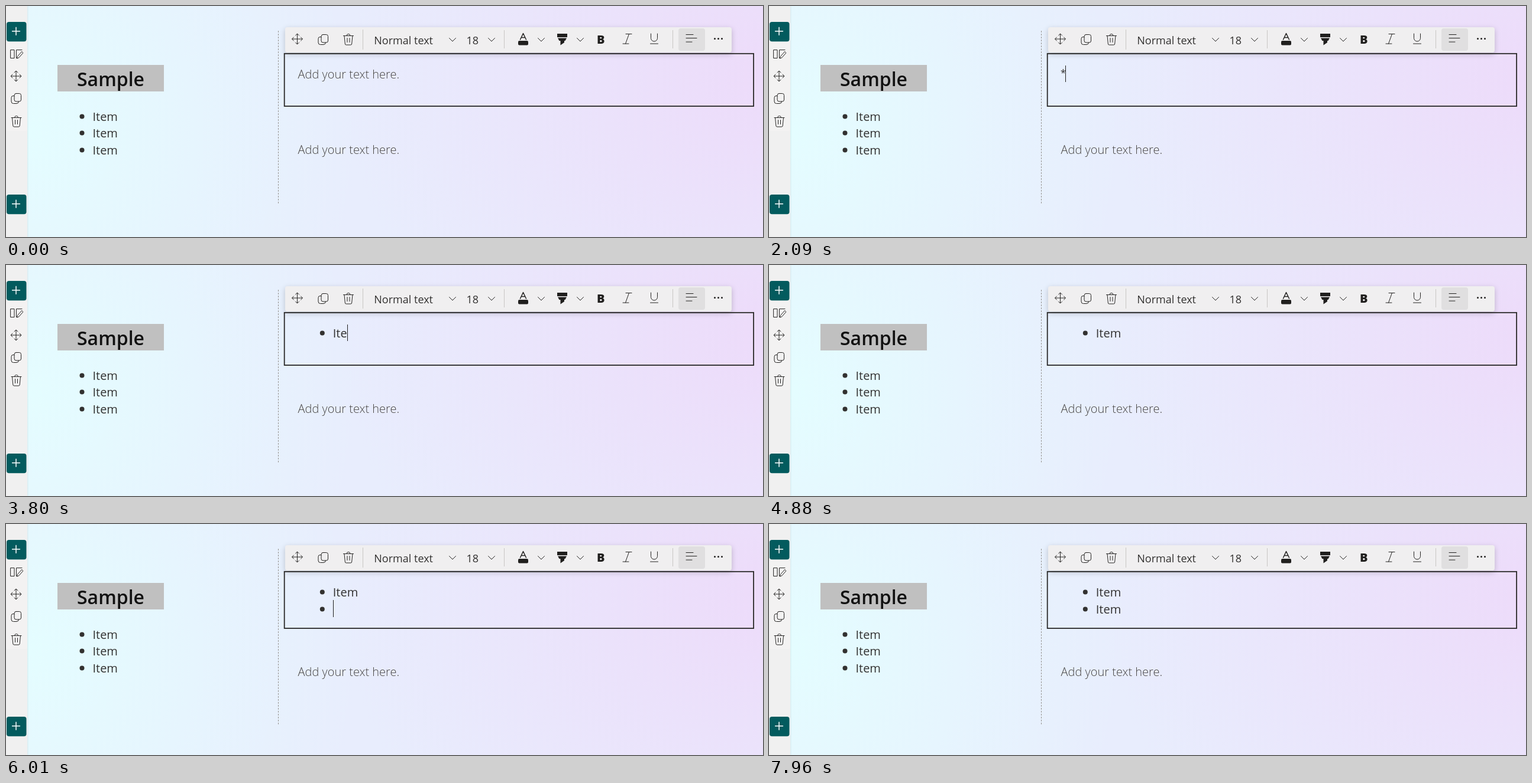
An HTML page that plays this animation: 1280 px wide and 392 px high, repeating every 8000 ms.

```html
<!DOCTYPE html>
<html lang="en">
<head>
<meta charset="utf-8">
<title>Typing a bulleted list</title>
<style>
  html, body { margin: 0; width: 100%; height: 100%; overflow: hidden; }
  body {
    background:
      radial-gradient(ellipse 560px 620px at 40px 215px, #e4fdff, #e4fdff00),
      radial-gradient(ellipse 720px 640px at 1290px 120px, #eddbfa, #eddbfa00),
      #e8edfd;
  }
  svg { display: block; width: 100vw; height: 100vh; }
  text { font: 20px "Open Sans", "Noto Sans", sans-serif; fill: #323130; }
  .hint { font-weight: 300; fill: #484644; }
  .tool { font-size: 18px; }
  .icon { fill: none; stroke: #252423; stroke-linecap: round; stroke-linejoin: round; }
  .solid { fill: #201f1e; }
  .rule { stroke: #c8c6c4; }
  .raised { filter: drop-shadow(0 3px 5px #0003); }
</style>
</head>
<body>
<svg viewBox="0 0 1280 392">
  <defs>
    <path id="move" d="M-8.5 0H8.5M0-8.5V8.5M-3-6 0-9 3-6M-3 6 0 9 3 6M-6-3-9 0-6 3M6-3 9 0 6 3"/>
    <path id="copy" d="M0-8.5H5.5a3 3 0 0 1 3 3V2a3 3 0 0 1-3 3H0a3 3 0 0 1-3-3V-5.5a3 3 0 0 1 3-3ZM-3-4.5H-5a3 3 0 0 0-3 3V5a3.5 3.5 0 0 0 3.5 3.5H1a3.5 3.5 0 0 0 3.5-3.5"/>
    <path id="trash" d="M-8.5-6.5H8.5M-3-6.5a3 3 0 0 1 6 0M-7-6.5-5.7 7a2 2 0 0 0 2 2H3.7a2 2 0 0 0 2-2L7-6.5M-2-2.5V4.5M2-2.5V4.5"/>
    <path id="chevron" d="M-5.5-2.5 0 3 5.5-2.5"/>
    <g id="add">
      <rect x="1" width="33.5" height="33.3" rx="4" fill="#035b5e"/>
      <path d="M10 15.7H24M17 8.7V22.7" stroke="#fff" stroke-width="1.5"/>
    </g>
  </defs>

  <rect width="36" height="392" fill="#f0f0f0" style="filter:drop-shadow(1px 0 1px #0001)"/>
  <rect y="61" width="36" height="151" rx="3" fill="#f3f2f2"/>
  <use href="#add" y="27"/>
  <use href="#add" id="addBelow"/>
  <g class="icon">
    <path d="M8 74.5h6v14H8ZM27 74.5H17.5v14H19M26.5 77.5l-7 8-1 3.5 3.3-1.3 6.7-7.7Z"/>
    <use href="#move" x="17" y="119"/>
    <use href="#copy" x="17" y="157"/>
    <use href="#trash" x="17.5" y="196"/>
  </g>

  <rect x="87" y="100" width="180" height="45" fill="#c0c0c0"/>
  <text x="120" y="136" style="font-size:32px;font-weight:600;fill:#111">Sample</text>
  <g id="list"></g>
  <path id="divider" stroke="#979593" stroke-dasharray="3 2"/>

  <rect id="frame" x="470.7" y="80.8" width="793.4" fill="none" stroke="#292827" stroke-width="1.8"/>
  <g class="raised">
    <rect x="472" y="36" width="755" height="43" rx="4" fill="#f0eff0"/>
  </g>
  <rect x="1137" y="38" width="45" height="38" rx="4" fill="#e0dfe0"/>
  <path class="rule" d="M603.5 40V74M842.5 41V72M1127.5 41V72"/>
  <g class="icon">
    <use href="#move" x="492.5" y="56"/>
    <use href="#copy" x="536" y="57"/>
    <use href="#trash" x="579" y="57"/>
    <use href="#chevron" x="755" y="57"/>
    <use href="#chevron" x="821" y="57"/>
    <use href="#chevron" x="905" y="57"/>
    <use href="#chevron" x="971" y="57"/>
    <path d="M869.5 57 874.5 46.5 879.5 57M871.3 53.5H877.7" stroke-width="1.5"/>
    <path d="M1048 47.5H1058M1043 64H1053M1053.5 47.5 1047.5 64"/>
    <path d="M1090.5 47V54.5a5.5 5.5 0 0 0 11 0V47M1089.5 64H1102.5"/>
    <path d="M1150 48.5H1162M1150 54.5H1168M1150 61H1160"/>
  </g>
  <g class="solid">
    <rect x="866" y="59" width="17" height="7.5" rx="2"/>
    <path d="M932 47H949V53H932ZM933 54.5H948L945.5 59H944V62L937.5 66.5V59H935.5Z"/>
    <circle cx="1198.5" cy="55.5" r="1.5"/>
    <circle cx="1204.5" cy="55.5" r="1.5"/>
    <circle cx="1210.5" cy="55.5" r="1.5"/>
  </g>
  <text class="tool" x="622.3" y="65">Normal text</text>
  <text class="tool" x="778.5" y="65">18</text>
  <text x="999" y="63.5" style="font-weight:800;fill:#201f1e">B</text>

  <text class="hint" id="hint" x="493.5" y="123">Add your text here.</text>
  <text id="star" x="493" y="119" style="font-size:16px">*</text>
  <g id="typed"></g>
  <rect id="caret" width="1" fill="#201f1e"/>
  <text class="hint" id="hintBelow" x="493.5">Add your text here.</text>
</svg>
<script>
const $ = id => document.getElementById(id);
const LOOP = 8000, BLINK = 203, WORD = 'Item';
const HINT = -2, STAR = -1;          // 0-4: letters in line one, 5-9: letters in line two
const caretX = [553, 558, 565, 577, 595];

// [editor state, start time]; every entry restarts the caret blink.
const steps = [
  [HINT, -266], [STAR, 1684],
  [0, 2420], [1, 3290], [1, 3347], [2, 3650], [3, 3800], [4, 4072],
  [5, 5010], [6, 6160], [7, 6520], [8, 6690], [9, 6945]
];

const bullet = (x, y, label) =>
  `<g><circle cx="${x}" cy="${y - 7.5}" r="4" fill="#323130"/><text x="${x + 18}" y="${y}">${label}</text></g>`;
const show = (el, on) => el.setAttribute('visibility', on ? 'visible' : 'hidden');
const set = (el, attrs) => { for (const k in attrs) el.setAttribute(k, attrs[k]); };

$('list').innerHTML = [195, 223, 252].map(y => bullet(128.5, y, WORD)).join('');
$('typed').innerHTML = [123, 152].map(y => bullet(534.8, y, '')).join('');
const lines = [...$('typed').children];

function draw(t) {
  const [state, start] = steps.findLast(s => s[1] <= t);
  const second = state >= 5, grow = second ? 7 : 0;

  show($('hint'), state === HINT);
  show($('star'), state === STAR);
  lines.forEach((line, i) => {
    const count = state - i * 5;
    show(line, count >= 0);
    line.lastChild.textContent = WORD.slice(0, Math.max(0, count));
  });

  show($('caret'), Math.floor((t - start) / BLINK) % 2 === 0);
  set($('caret'), {
    x: state === HINT ? 493 : state === STAR ? 501 : caretX[state % 5],
    y: second ? 129 : state === HINT ? 100 : 101,
    height: second || state === HINT ? 29 : 28
  });
  set($('frame'), { height: 89.2 + grow });
  set($('addBelow'), { y: 320 + grow });
  set($('hintBelow'), { y: 251 + grow });
  set($('divider'), { d: `M460.5 42V${335 + grow}` });
}

function tick() {
  draw(performance.now() % LOOP);
  requestAnimationFrame(tick);
}
tick();
</script>
</body>
</html>
```
